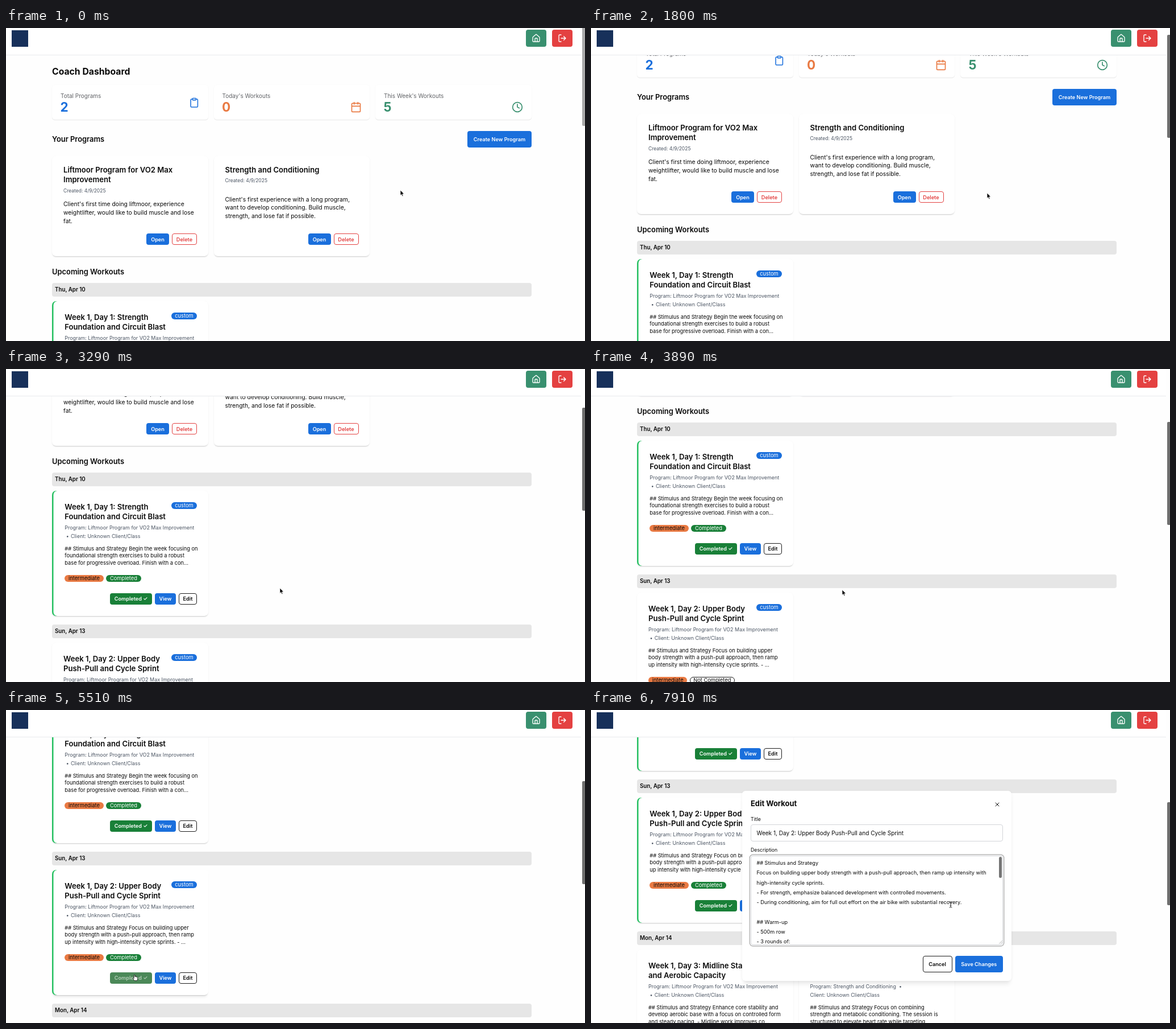
An HTML page for the animation above (8 s loop, 1019 px wide and 550 px high).

```html
<!DOCTYPE html>
<html lang="en">
<head>
<meta charset="utf-8">
<title>Coach Dashboard</title>
<style>
  html, body { margin: 0; width: 100%; height: 100%; overflow: hidden; background: #fefefe; }
  body { position: relative; font-family: Inter, "Open Sans", sans-serif; color: #0a0a0a; }
  div, svg { position: absolute; box-sizing: border-box; }
  svg { fill: none; stroke: currentColor; stroke-width: 2; stroke-linecap: round; stroke-linejoin: round; overflow: visible; }
  #page { left: 0; top: 0; width: 1012px; height: 1400px; }
  #header { left: 0; top: 0; width: 1012px; height: 48px; background: #fff; border-bottom: 1px solid #e8eaed; }
  .t { white-space: pre; line-height: 20px; height: 20px; }
  .h1 { font-size: 15.75px; font-weight: 700; }
  .h2 { font-size: 12.9px; font-weight: 600; }
  .h3 { font-size: 13.1px; font-weight: 600; }
  .date { font-size: 9.75px; font-weight: 600; }
  .body { font-size: 10.35px; }
  .input { font-size: 10.05px; }
  .stat { font-size: 10px; color: #606266; }
  .num { font-size: 22.5px; font-weight: 700; }
  .meta { font-size: 8.95px; color: #4b5563; }
  .made { font-size: 8.5px; color: #4b5563; }
  .small { font-size: 9.28px; }
  .note { font-size: 9.15px; }
  .label { font-size: 8.75px; }
  .card { background: #fff; border-radius: 7px; box-shadow: 0 2px 2px -1px rgba(0,0,0,.17), 0 1px 3px rgba(0,0,0,.05); }
  .flat { background: #fff; border-radius: 5px; box-shadow: 0 1px 1px rgba(0,0,0,.09), 0 0 2px rgba(0,0,0,.03); }
  .done { box-shadow: inset 2.5px 0 #24c060, 0 2px 2px -1px rgba(0,0,0,.17), 0 1px 3px rgba(0,0,0,.05); }
  .done.hover { box-shadow: inset 2.5px 0 #24c060, 0 2px 2px -1px rgba(0,0,0,.17), 0 6px 4px -2px rgba(0,0,0,.06); }
  .bar { background: #e6e6e6; border-radius: 4px; }
  .btn, .pill { display: flex; align-items: center; justify-content: center; white-space: pre; }
  .btn { border-radius: 4px; font-size: 9.15px; font-weight: 600; }
  .pill { border-radius: 6px; font-size: 9.3px; }
  .blue { background: #1a6fdc; color: #fff; }
  .green { background: #198038; color: #fff; }
  .orange { background: #e97a43; }
  .line { background: #fff; border: 1px solid #1d1d1d; }
  .red { background: #fff; border: 1px solid #e34242; color: #e34242; }
  .busy { background: #4b8858; color: #b5ceb9; }
  #modal { background: #fff; border-radius: 6px; box-shadow: 0 9px 7px -3px rgba(0,0,0,.07), 0 1px 5px rgba(0,0,0,.05); }
  .field { background: #fff; border: 1px solid #d3d5d9; border-radius: 4px; overflow: hidden; }
  .ring { box-shadow: 0 0 0 1.2px #fff, 0 0 0 2.4px #a6a6a6; }
  #thumb { left: 1014px; width: 5px; height: 181px; border-radius: 2px 0 0 2px; }
</style>
</head>
<body>
<div id="page"></div>
<div id="header"></div>
<div id="thumb"></div>
<div id="modal"></div>
<svg id="cursor" width="1" height="1">
  <path data-kind="arrow" d="M0 0V9.3L2.1 7.4L3.5 10.7L5.1 10L3.7 6.8H6.6Z" fill="#000" stroke="#fff" stroke-width=".8"/>
  <path data-kind="hand" d="M-.9 5.6V.8Q0-.5.9.8V3.8Q2-.1 2.6 4Q3.9 3 4.2 4.5Q5.5 3.8 5.6 5.4V7.4Q5.3 9 4.6 10.6H.2Q-1.4 8.7-2.8 6.5Q-2.6 5-.9 6.4Z" fill="#fff" stroke="#111" stroke-width=".8"/>
  <path data-kind="beam" d="M-2-5Q0-5 0-3.6Q0-5 2-5M0-3.6V3.6M-2 5Q0 5 0 3.6Q0 5 2 5M-1 1.3H1" stroke="#222" stroke-width=".9"/>
</svg>
<script>
const $ = id => document.getElementById(id);
const page = $('page'), header = $('header'), modal = $('modal'), thumb = $('thumb'), cursor = $('cursor');

function box(parent, x, y, w, h, cls, label = '') {
  const e = document.createElement('div');
  e.className = cls;
  Object.assign(e.style, { left: x + 'px', top: y + 'px', width: w + 'px', height: h + 'px' });
  e.textContent = label;
  parent.append(e);
  return e;
}
// y is the middle of the capital letters
function text(parent, x, y, str, cls) {
  const e = document.createElement('div');
  e.className = 't ' + cls;
  e.style.left = x + 'px';
  e.style.top = y - 10 + 'px';
  e.textContent = str;
  parent.append(e);
  return e;
}
const lines = (parent, x, y, gap, cls, list) =>
  list.forEach((s, i) => text(parent, x, y + i * gap, s, cls));

function icon(parent, cx, cy, size, color, d) {
  const e = document.createElementNS('http://www.w3.org/2000/svg', 'svg');
  e.setAttribute('viewBox', '0 0 24 24');
  e.setAttribute('width', size);
  e.setAttribute('height', size);
  e.style.cssText = `left:${cx - size / 2}px;top:${cy - size / 2}px;color:${color}`;
  e.innerHTML = `<path d="${d}"/>`;
  parent.append(e);
}

// header
box(header, 10, 4, 29, 29, '').style.background = '#17305a';
box(header, 915, 3, 36, 30, 'btn').style.background = '#39906f';
box(header, 961, 3, 36, 30, 'btn').style.background = '#e44141';
icon(header, 933, 17.8, 16, '#fff', 'M15 21v-8a1 1 0 0 0-1-1h-4a1 1 0 0 0-1 1v8M3 10a2 2 0 0 1 .7-1.5l7-6a2 2 0 0 1 2.6 0l7 6A2 2 0 0 1 21 10v9a2 2 0 0 1-2 2H5a2 2 0 0 1-2-2z');
icon(header, 979, 17.8, 16, '#fff', 'M9 21H5a2 2 0 0 1-2-2V5a2 2 0 0 1 2-2h4M16 17l5-5-5-5M21 12H9');

// statistics
text(page, 81, 77, 'Coach Dashboard', 'h1');
[['Total Programs', '2', '#1a6fdc'], ["Today's Workouts", '0', '#e97a43'], ["This Week's Workouts", '5', '#39906f']]
  .forEach(([name, value, color], i) => {
    const x = 81 + i * 284.5;
    box(page, x, 100, 274.5, 61, 'flat');
    text(page, x + 15, 119, name, 'stat');
    text(page, x + 14.5, 139, value, 'num').style.color = color;
  });
icon(page, 331, 131.5, 18.5, '#1a6fdc', 'M9 2h6a1 1 0 0 1 1 1v2a1 1 0 0 1-1 1H9a1 1 0 0 1-1-1V3a1 1 0 0 1 1-1zM16 4h2a2 2 0 0 1 2 2v14a2 2 0 0 1-2 2H6a2 2 0 0 1-2-2V6a2 2 0 0 1 2-2h2');
icon(page, 615.5, 139, 20, '#e97a43', 'M5 4h14a2 2 0 0 1 2 2v14a2 2 0 0 1-2 2H5a2 2 0 0 1-2-2V6a2 2 0 0 1 2-2zM16 2v4M8 2v4M3 10h18');
icon(page, 900, 139, 20, '#39906f', 'M12 2a10 10 0 1 0 0 20a10 10 0 1 0 0-20M12 6v6l4 2');

// programs
text(page, 81, 195.5, 'Your Programs', 'h2');
box(page, 812, 181, 113, 29, 'btn blue', 'Create New Program');

function program(x, title, madeY, bodyY, body) {
  box(page, x, 225, 274.5, 176, 'card');
  lines(page, x + 20, 248.5, 17.4, 'h3', title);
  text(page, x + 20, madeY, 'Created: 4/9/2025', 'made');
  lines(page, x + 20, bodyY, 14.8, 'body', body);
  box(page, x + 166, 361, 40, 20, 'btn blue', 'Open');
  box(page, x + 211, 361, 44, 20, 'btn red', 'Delete');
}
program(81, ['Liftmoor Program for VO2 Max', 'Improvement'], 285.5, 309,
  ["Client's first time doing liftmoor, experience", 'weightlifter, would like to build muscle and lose', 'fat.']);
program(365.5, ['Strength and Conditioning'], 268, 300.5,
  ["Client's first experience with a long program,", 'want to develop conditioning. Build muscle,', 'strength, and lose fat if possible.']);

// workouts
text(page, 81, 429, 'Upcoming Workouts', 'h2');
[['Thu, Apr 10', 447.5], ['Sun, Apr 13', 714.5], ['Mon, Apr 14', 981.5]].forEach(([day, y]) => {
  box(page, 81, y, 844, 24.5, 'bar');
  text(page, 86, y + 12.5, day, 'date');
});

const CLIENT = 'Client: Unknown Client/Class';
function workout(x, y, done, title, meta, body) {
  const root = box(page, 0, 0, 0, 0, '');
  const card = box(root, x, y, 274.5, 219.5, done ? 'card done' : 'card');
  const l = x + (done ? 22.3 : 20);
  lines(root, l, y + 28, 17.3, 'h3', title);
  box(root, x + 210, y + 19.5, 45, 12, 'pill blue', 'custom');
  text(root, l, y + 65, 'Program: ' + meta, 'meta');
  if (meta.endsWith('•')) text(root, l, y + 79.7, CLIENT, 'meta');
  else {
    text(root, l + 2.5, y + 79.7, '•', 'meta');
    text(root, l + 10.8, y + 79.7, CLIENT, 'meta');
  }
  lines(root, l, y + 102, 12.3, 'small', body);
  box(root, l, y + 147.5, 68.3, 12, 'pill orange', 'intermediate');
  if (done) box(root, l + 73, y + 147.5, 61.3, 12, 'pill green', 'Completed');
  else box(root, l + 73, y + 147.5, 78.5, 12, 'pill line', 'Not Completed');
  const mark = done
    ? box(root, x + 102, y + 179.5, 74, 20, 'btn green', 'Completed ✓')
    : box(root, x + 92, y + 179.5, 84, 20, 'btn line', 'Mark Complete');
  box(root, x + 181, y + 179.5, 37, 20, 'btn blue', 'View');
  box(root, x + 223, y + 179.5, 32, 20, 'btn line', 'Edit');
  return { root, card, mark };
}
const VO2 = 'Liftmoor Program for VO2 Max Improvement';
const LEAD = '## Stimulus and Strategy ';
workout(81, 480, true, ['Week 1, Day 1: Strength', 'Foundation and Circuit Blast'], VO2,
  [LEAD + 'Begin the week focusing on', 'foundational strength exercises to build a robust', 'base for progressive overload. Finish with a con…']);
const [todo, ready] = [false, true].map(done =>
  workout(81, 747, done, ['Week 1, Day 2: Upper Body', 'Push-Pull and Cycle Sprint'], VO2,
    [LEAD + 'Focus on building upper', 'body strength with a push-pull approach, then ramp', 'up intensity with high-intensity cycle sprints. - …']));
workout(81, 1014, false, ['Week 1, Day 3: Midline Stability', 'and Aerobic Capacity'], VO2,
  [LEAD + 'Enhance core stability and', 'develop aerobic base with a focus on controlled form', 'and steady pacing. - Midline work improves co…']);
workout(365.5, 1014, false, ['Week 1, Day 1: Full Body', 'Strength and Capacity Builder'], 'Strength and Conditioning  •',
  [LEAD + 'Focus on combining', 'strength and metabolic conditioning. The session is', 'structured to elevate heart rate while targeting']);

// edit dialog, placed relative to its own corner
Object.assign(modal.style, { left: '266px', top: '142px', width: '474px', height: '334px' });
text(modal, 15, 23, 'Edit Workout', 'h2').style.fontWeight = 700;
icon(modal, 449, 24, 12, '#111', 'M6 6L18 18M18 6L6 18');
text(modal, 15, 49.5, 'Title', 'label');
box(modal, 15, 59, 444, 29.5, 'field');
text(modal, 25.5, 73.5, 'Week 1, Day 2: Upper Body Push-Pull and Cycle Sprint', 'input');
text(modal, 15, 104, 'Description', 'label');
const area = box(modal, 15, 113.5, 444, 157, 'field');
lines(area, 9.5, 12.5, 17.25, 'note', [
  '## Stimulus and Strategy',
  'Focus on building upper body strength with a push-pull approach, then ramp up intensity with',
  'high-intensity cycle sprints.',
  '- For strength, emphasize balanced development with controlled movements.',
  '- During conditioning, aim for full out effort on the air bike with substantial recovery.',
  '', '## Warm-up', '- 500m row', '- 3 rounds of:']);
box(area, 436, 1.5, 5, 37, '').style.cssText += 'background:#757575;border-radius:3px';
icon(area, 439, 151.5, 6, '#777', 'M2 22L22 2M13 22L22 13');
box(modal, 317.5, 290, 52, 29, 'btn line', 'Cancel');
box(modal, 374.5, 290, 84.5, 29, 'btn blue', 'Save Changes');

// motion tables: time, then values
const SCROLL = [[0, 0], [600, 0], [1050, 14], [1650, 47], [1800, 74], [2690, 163], [2840, 200],
  [3890, 354], [4030, 430], [4180, 466], [5510, 466], [5660, 542], [5810, 593], [8000, 593]];
const POINTER = [[0, 694, 285], [600, 694, 285], [1800, 697, 290], [2690, 522, 382], [3890, 442, 388],
  [4180, 415, 396], [4900, 240, 461], [5070, 226, 465], [5510, 226, 465], [5810, 237, 462],
  [6260, 320, 343], [6560, 320, 343], [7310, 453, 338], [7460, 455, 337], [7910, 633, 341.5], [8000, 633, 341.5]];
const KINDS = [[0, 'arrow'], [4850, 'hand'], [5600, 'arrow'], [5750, 'beam'], [6050, 'arrow'],
  [6200, 'hand'], [6800, 'arrow'], [7000, 'beam']];

function at(track, t) {
  const i = Math.max(1, track.findIndex(k => k[0] >= t));
  const a = track[i - 1], b = track[i], p = (t - a[0]) / (b[0] - a[0]);
  return a.slice(1).map((v, n) => v + (b[n + 1] - v) * p);
}

// the screen refreshes about every 150 ms
const ticks = [0, 750];
for (let i = 1; i <= 48; i++)
  ticks.push(ticks[i] + ([12, 22, 27, 32].includes(i) ? 140 : 150));

const show = (e, on) => { e.style.visibility = on ? 'visible' : 'hidden'; };

function draw() {
  const now = performance.now() % 8000;
  const t = ticks.filter(v => v <= now).pop();
  const y = Math.round(at(SCROLL, t)[0]);
  page.style.transform = `translateY(${-y}px)`;
  thumb.style.top = -9.5 + y * 0.2895 + 'px';
  thumb.style.background = y ? '#6f6f6f' : '#aaa';

  const done = t >= 5200, over = t >= 4850 && t < 5600;
  show(todo.root, !done);
  show(ready.root, done);
  ready.mark.classList.toggle('busy', over);
  ready.card.classList.toggle('hover', over);

  show(modal, t >= 6850);
  area.classList.toggle('ring', t >= 7300);

  const [cx, cy] = at(POINTER, t);
  cursor.style.left = cx + 'px';
  cursor.style.top = cy + 'px';
  const kind = KINDS.filter(k => k[0] <= t).pop()[1];
  for (const p of cursor.children) show(p, p.dataset.kind === kind);
  requestAnimationFrame(draw);
}
draw();
</script>
</body>
</html>
```
